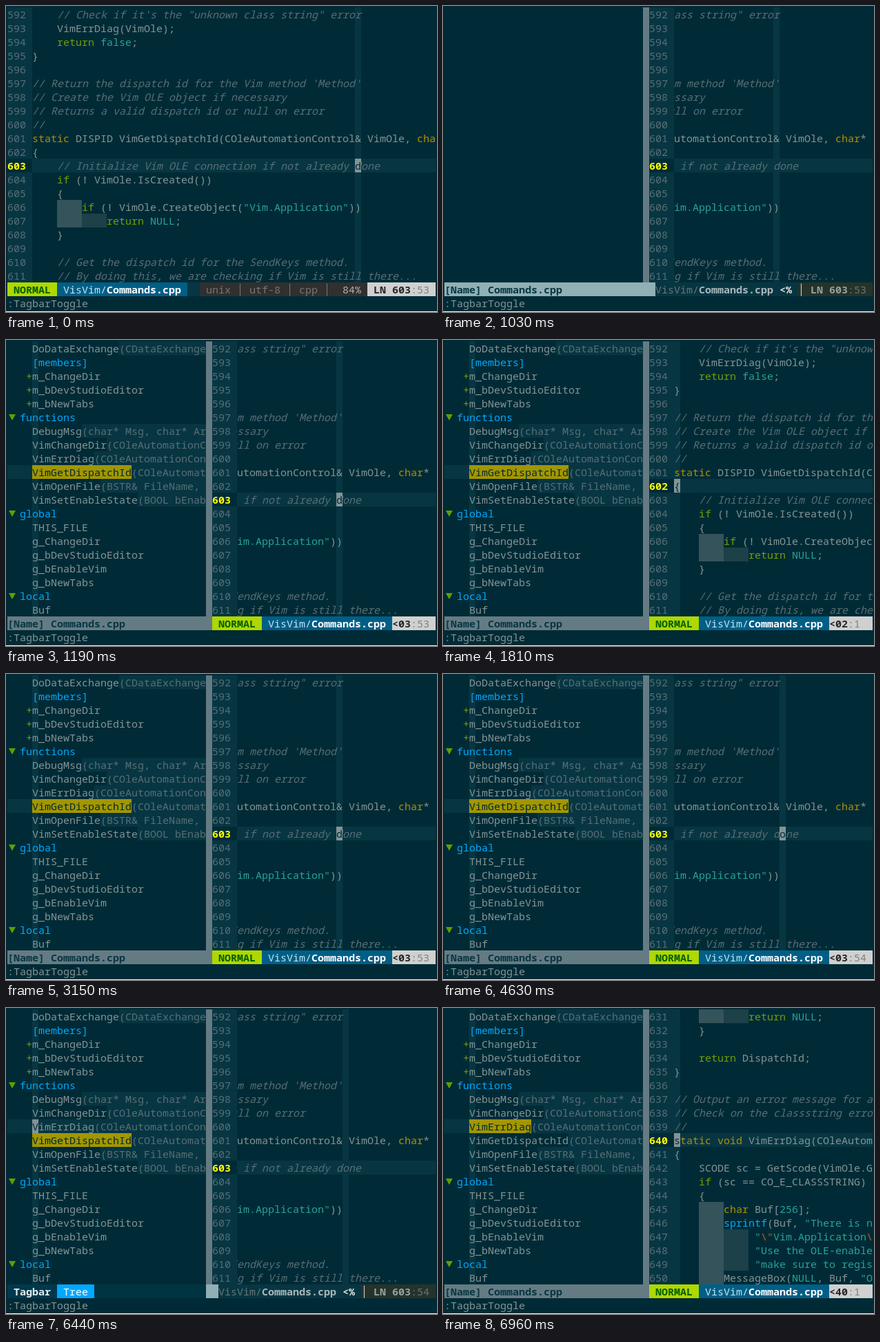
Write an HTML page that moves like this. It is 625 px wide and 445 px high and loops after 8000 ms.

```html
<!DOCTYPE html>
<html lang="en">
<head>
<meta charset="utf-8">
<title>Tagbar in Vim</title>
<style>
html, body { margin: 0; width: 100%; height: 100%; overflow: hidden; background: #002b36; }
#stage { position: relative; width: 625px; height: 445px; overflow: hidden; background: #002b36;
  box-shadow: inset 0 -1px #fff;
  font: 15px/20px "Noto Sans Mono", "DejaVu Sans Mono", monospace; color: #839496; }
#stage div { position: absolute; white-space: pre; }
.scene { left: 2px; top: 2px; width: 621px; height: 440px; visibility: hidden; }
.scene.on { visibility: visible; }
.pane { top: 0; height: 400px; overflow: hidden; }
.tri { background: #5f9f00; clip-path: polygon(0 0, 100% 0, 50% 100%); }
.com { color: #586e75; font-style: italic; }
.key { color: #719e07; }
.type { color: #b09000; }
.str { color: #2aa198; }
.esc, .name { color: #cb5a16; }
.fn { color: #00a8ff; }
b { font-weight: 700; }
</style>
</head>
<body>
<div id="stage"></div>
<script>
const CW = 9, LH = 20, ROWS = 20;
const C = {
  bg: '#002b36', line: '#073642', dim: '#586e75', text: '#839496', cur: '#839496',
  sep: '#657b83', lit: '#90b0b5', even: '#34535b', odd: '#1d4049', hit: '#a29600', blue: '#00a8ff'
};

const codeA = `    // Check if it's the "unknown class string" error
    VimErrDiag(VimOle);
    return false;
}

// Return the dispatch id for the Vim method 'Method'
// Create the Vim OLE object if necessary
// Returns a valid dispatch id or null on error
//
static DISPID VimGetDispatchId(COleAutomationControl& VimOle, char* Method)
{
    // Initialize Vim OLE connection if not already done
    if (! VimOle.IsCreated())
    {
        if (! VimOle.CreateObject("Vim.Application"))
            return NULL;
    }

    // Get the dispatch id for the SendKeys method.
    // By doing this, we are checking if Vim is still there...`.split('\n');

const codeB = String.raw`            return NULL;
    }

    return DispatchId;
}

// Output an error message for an OLE error
// Check on the classstring error code
//
static void VimErrDiag(COleAutomationControl& VimOle)
{
    SCODE sc = GetScode(VimOle.GetError());
    if (sc == CO_E_CLASSSTRING)
    {
        char Buf[256];
        sprintf(Buf, "There is no registered OLE server "
             "\"Vim.Application\".\n"
             "Use the OLE-enabled version of Vim and "
             "make sure to register Vim by running it.",
        MessageBox(NULL, Buf, "OLE Error", MB_OK);`.split('\n');

const tagsA = `      WindowActivate(IDispatch *
      WindowDeactivate(IDispatch
      WorkspaceClose()
      WorkspaceOpen()
  v XDebuggerEvents* : class
      [functions]
      BreakpointHit(IDispatch *
    [functions]
    CCommands()
    ~CCommands()
    SetApplicationObject(IApplic
    UnadviseFromEvents()
    VisVimDialog()
    VisVimDisable()
    VisVimEnable()
    VisVimLoad()
    VisVimToggle()
v CMainDialog : class
  v __anon1* : enum
      [enumerators]`.split('\n');

const tagsB = `    DoDataExchange(CDataExchange
    [members]
   +m_ChangeDir
   +m_bDevStudioEditor
   +m_bNewTabs
v functions
    DebugMsg(char* Msg, char* Ar
    VimChangeDir(COleAutomationC
    VimErrDiag(COleAutomationCon
    VimGetDispatchId(COleAutomat
    VimOpenFile(BSTR& FileName, 
    VimSetEnableState(BOOL bEnab
v global
    THIS_FILE
    g_ChangeDir
    g_bDevStudioEditor
    g_bEnableVim
    g_bNewTabs
v local
    Buf`.split('\n');

const esc = s => s.replace(/&/g, '&amp;').replace(/</g, '&lt;');
const span = (cls, s) => `<span class="${cls}">${s}</span>`;
const indentOf = s => s.length - s.trimStart().length;

// Position and size are in character cells.
const box = (col, row, w, bg, h = 1) =>
  `<div style="left:${col * CW}px;top:${row * LH}px;width:${w * CW}px;height:${h * LH}px;background:${bg}"></div>`;
const put = (col, row, html, color = C.text) =>
  `<div style="left:${col * CW}px;top:${row * LH}px;color:${color}">${html}</div>`;
const pane = (col, w, html) =>
  `<div class="pane" style="left:${col * CW}px;width:${w * CW}px">${html}</div>`;
const cursor = (col, row, ch) => box(col, row, 1, C.cur) + put(col, row, esc(ch), C.bg);

const tokens = /(\/\/.*)|("(?:\\.|[^"\\])*"?)|\b(if|return)\b|\b(static|char|void)\b|\b(false|NULL|256)\b|\b(sprintf)\b|[^"\/\w]+|\w+|./g;
function paint(line) {
  return line.replace(tokens, (m, com, str, key, type, val, fn) => {
    const s = esc(m);
    if (com) return span('com', s);
    if (str) return span('str', s.replace(/\\./g, e => span('esc', e)));
    if (key) return span('key', s);
    if (type) return span('type', s);
    if (val) return span('str', s);
    return fn ? span('fn', s) : s;
  });
}

function editor(at, lines, first, row, col, scroll, focus) {
  const w = 69 - at - 4;
  let gutter = box(at, 0, 4, C.line, ROWS) + box(at, row, 4, C.bg);
  let body = box(col - scroll, 0, 1, C.line, ROWS) + box(0, row, w, C.line);
  lines.forEach((s, i) => {
    gutter += i === row
      ? put(at, i, `<b>${first + i}</b>`, '#ffff00')
      : put(at, i, first + i, C.dim);
    const n = indentOf(s);
    if (n >= 8) body += box(4 - scroll, i, 4, C.even);
    if (n >= 12) body += box(8 - scroll, i, 4, C.odd);
    body += put(-scroll, i, paint(s));
  });
  if (focus) body += cursor(col - scroll, row, lines[row][col]);
  return gutter + pane(at + 4, w, body);
}

function triangle(col, row) {
  const w = col ? 8 : 10;
  return `<div class="tri" style="left:${col * CW + 2}px;top:${row * LH + 6}px;width:${w}px;height:9px"></div>`;
}

function tagbar({ lines, row, col = 4, hit = -1, focus }) {
  let out = box(col, 0, 1, C.line, ROWS) + box(0, row, 32, C.line);
  lines.forEach((s, i) => {
    const n = indentOf(s), t = s.trim();
    if (n >= 6) out += box(4, i, 1, C.even);
    if (t.startsWith('v ')) {
      const [name, kind] = t.slice(2).split(' : ');
      out += triangle(n, i) + put(n + 2, i, kind
        ? span('name', name) + ' : ' + span('type', kind)
        : span('fn', name));
    } else if (t[0] === '[') {
      out += put(n, i, span('fn', t));
    } else if (t[0] === '+') {
      out += put(n, i, span('key', '+') + t.slice(1));
    } else {
      const cut = s.indexOf('('), end = cut < 0 ? s.length : cut;
      if (i === hit) out += box(n, i, end - n, C.hit);
      out += put(n, i, esc(s.slice(n, end)), i === hit ? C.bg : C.text);
      if (cut >= 0) out += box(cut, i, s.length - cut, C.line) + put(cut, i, esc(s.slice(cut)), C.dim);
    }
  });
  if (focus) out += cursor(col, row, lines[row][col]);
  return pane(0, 32, out);
}

const mode = col => box(col, 20, 8, '#afd700') + put(col + 1, 20, '<b>NORMAL</b>', '#005f00') +
  box(col + 8, 20, 21, '#005f87') + put(col + 9, 20, 'VisVim/<b style="color:#fff">Commands.cpp</b>', '#c5e4ee');
const place = (col, label, pos) => box(col, 20, 69 - col, '#d0d0d0') +
  put(col === 58 ? 59 : col, 20, `<b>${esc(label)}</b><span style="color:#808080">:${pos}</span>`, '#262626');

function wideStatus() {
  let out = mode(0) + box(29, 20, 2, '#073642') + box(31, 20, 27, '#303030');
  [[32, 'unix'], [39, 'utf-8'], [47, 'cpp']].forEach(([c, s]) => out += put(c, 20, s, '#767676'));
  [37, 45, 51].forEach(c => out += put(c, 20, '│', '#767676'));
  return out + put(54, 20, '84%', '#b0b0b0') + place(58, 'LN 603', 53);
}

const idleStatus = pos => box(32, 20, 2, C.lit) + box(34, 20, 23, C.line) + box(57, 20, 12, '#26332a') +
  put(34, 20, 'VisVim/<b style="color:#a8b8ba">Commands.cpp</b>', '#66757a') +
  put(54, 20, '<b>&lt;%</b>', '#e0e0e0') + put(57, 20, '│', '#d0d0d0') +
  put(59, 20, `<b>LN 603</b><span style="color:#66757a">:${pos}</span>`, '#93a1a1');
const nameStatus = lit => box(0, 20, 33, lit ? C.lit : C.sep) +
  put(0, 20, '<b>[Name] Commands.cpp</b>', C.line);
const treeStatus = () => box(0, 20, 8, '#00394d') + put(1, 20, '<b>Tagbar</b>', '#e4eef0') +
  box(8, 20, 6, C.blue) + put(9, 20, 'Tree', '#fff') + box(14, 20, 18, '#003441');

const split = (left, right, status) => left + box(32, 0, 1, C.sep, ROWS) + right + status;
const tags = (row, hit, focus) => tagbar({ lines: tagsB, row, hit, focus });
const scrolled = (col, focus) => editor(33, codeA, 592, 11, col, 36, focus);
const active = (label, pos) => nameStatus(false) + mode(33) + place(62, label, pos);
const inactive = pos => idleStatus(pos) + nameStatus(true);

const at53 = () => split(tags(9, 9), scrolled(52, true), active('<03', 53));
const scenes = [
  [0, editor(0, codeA, 592, 11, 52, 0, true) + wideStatus()],
  [990, split('', scrolled(52), inactive(53))],
  [1080, split(tagbar({ lines: tagsA, row: 9, col: 0 }), scrolled(52), inactive(53))],
  [1140, split(tags(9, 9), scrolled(52), inactive(53))],
  [1190, at53()],
  [1810, split(tags(9, 9), editor(33, codeA, 592, 10, 0, 0, true), active('<02', 1))],
  [3150, at53()],
  [4630, split(tags(9, 9), scrolled(53, true), active('<03', 54))],
  [5830, split(tags(9, 9, true), scrolled(53), inactive(54))],
  [5870, split(tags(9, 9, true), scrolled(53), treeStatus() + idleStatus(54))],
  [6440, split(tags(8, 9, true), scrolled(53), treeStatus() + idleStatus(54))],
  [6960, split(tags(8, 8), editor(33, codeB, 631, 9, 0, 0, true), active('<40', 1))]
];

const stage = document.getElementById('stage');
stage.innerHTML = scenes.map(([, html]) =>
  `<div class="scene">${html}${put(0, 21, ':TagbarToggle')}</div>`).join('');
const views = [...stage.children];
const LOOP = 8000, start = performance.now();
let shown = -1;

function tick() {
  const t = Math.max(0, performance.now() - start) % LOOP;
  const now = scenes.findLastIndex(([from]) => from <= t);
  if (now !== shown) {
    views.forEach((v, i) => v.classList.toggle('on', i === now));
    shown = now;
  }
  requestAnimationFrame(tick);
}
tick();
</script>
</body>
</html>
```
